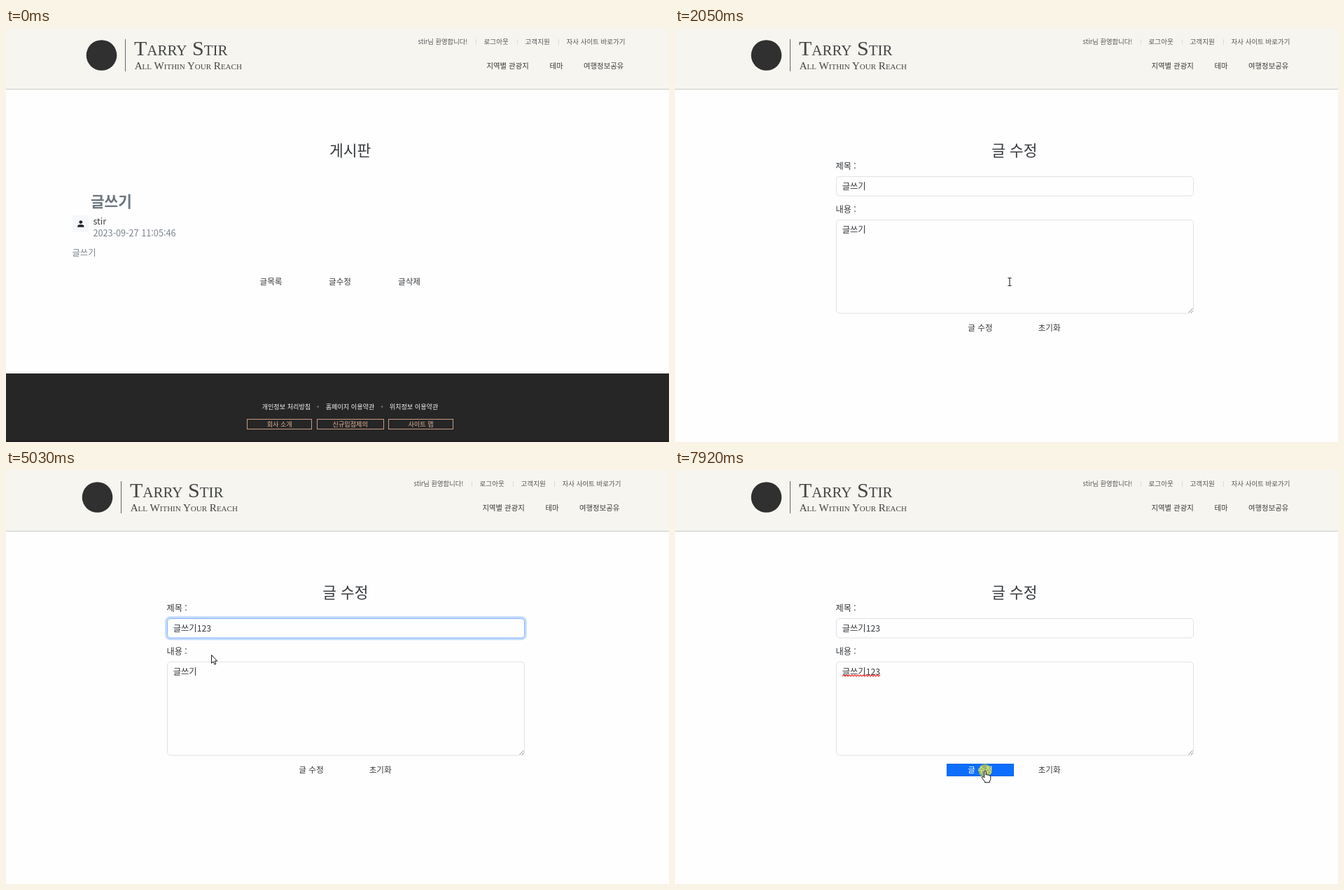
Animation, 947 px wide and 592 px high, one loop 8 s. Source, as an HTML page:

```html
<!DOCTYPE html>
<html lang="ko">
<head>
<meta charset="utf-8">
<title>게시판</title>
<style>
html, body { margin: 0; width: 100%; height: 100%; overflow: hidden; background: #fefefe; }
svg { display: block; width: 947px; height: 592px; }
text { font-family: "Noto Sans CJK KR", "Noto Sans KR", "Noto Sans CJK", "Noto Sans CJK JP", "Noto Sans", sans-serif; white-space: pre; }
.brand { font-family: "Liberation Serif", serif; font-variant: small-caps; }
</style>
</head>
<body>
<svg id="stage" viewBox="0 0 947 592" xmlns="http://www.w3.org/2000/svg"></svg>
<script>
const NS = 'http://www.w3.org/2000/svg';
const stage = document.getElementById('stage');
const LOOP = 8000, SWAP = 2050;
const PAPER = '#fefefe', TEXT = '#35383c', MUTED = '#7a838a';

function add(parent, tag, attrs, content) {
  const e = document.createElementNS(NS, tag);
  for (const k in attrs) e.setAttribute(k, attrs[k]);
  if (content) e.textContent = content;
  parent.appendChild(e);
  return e;
}
const group = (parent = stage) => add(parent, 'g', {});
const rect = (p, x, y, width, height, fill, more) => add(p, 'rect', { x, y, width, height, fill, ...more });
// Text is placed by its left edge and the vertical middle of its glyphs.
const label = (p, s, x, mid, size, fill = TEXT, weight = 400) =>
  add(p, 'text', { x, y: mid + size * 0.38, 'font-size': size, fill, 'font-weight': weight }, s);
const show = (e, on) => e.setAttribute('visibility', on ? 'inherit' : 'hidden');

// Header
rect(stage, 0, 0, 947, 87, '#f6f5f0');
rect(stage, 0, 87, 947, 1, '#cbcac8');
const head = group();
add(head, 'circle', { cx: 136.5, cy: 39, r: 21.8, fill: '#303030' });
rect(head, 170, 16, 1, 46, '#666');
add(head, 'text', { class: 'brand', x: 183, y: 39, 'font-size': 30, fill: '#444' }, 'Tarry Stir');
add(head, 'text', { class: 'brand', x: 183.7, y: 59, 'font-size': 15.1, fill: '#444' }, 'All Within Your Reach');
[['stir님 환영합니다!', 588.5, 9.3], ['로그아웃', 682.5, 9.6], ['고객지원', 741.5, 9.6], ['자사 사이트 바로가기', 800.5, 9.5]]
  .forEach(([s, x, size]) => label(head, s, x, 19.5, size, '#555'));
[671, 730, 789].forEach(x => rect(head, x, 16, 1, 8, '#dddcd8'));
[['지역별 관광지', 686.5], ['테마', 776.5], ['여행정보공유', 825]]
  .forEach(([s, x]) => label(head, s, x, 54.5, 10.4, '#383838'));

// A borderless button that is filled while the pointer is over it
function button(p, s, x, y, textX, fill, stroke) {
  const box = rect(p, x + .5, y + .5, 95, 17, fill, { stroke });
  const text = label(p, s, textX, y + 8.5, 11.6);
  const hit = (px, py) => px >= x && px <= x + 96 && py >= y && py <= y + 18;
  return {
    hit,
    set(on) {
      show(box, on);
      text.setAttribute('fill', on ? '#fff' : TEXT);
    }
  };
}

// Post page
const post = group();
label(post, '게시판', 462, 175.2, 21.5, TEXT, 300);
label(post, '글쓰기', 121, 248, 21.3, '#6c757d', 700);
rect(post, 95, 268, 23, 24, '#f6f7fa');
add(post, 'circle', { cx: 106.8, cy: 277.6, r: 2.4, fill: '#212529' });
add(post, 'path', { d: 'M102.2 284.8v-1.4c0-3.2 9.2-3.2 9.2 0v1.4z', fill: '#212529' });
label(post, 'stir', 124.5, 276.3, 12.6);
label(post, '2023-09-27 11:05:46', 124.5, 293.5, 12.7, MUTED, 300);
label(post, '글쓰기', 94.5, 321, 12.3, MUTED, 300);
const postButtons = [
  button(post, '글목록', 330, 354, 362.5, '#2d2d2d', '#0d6efd'),
  button(post, '글수정', 429, 354, 461, '#2d2d2d', '#198754'),
  button(post, '글삭제', 528, 354, 560, '#2d2d2d', '#dc3545')
];
rect(post, 0, 494, 947, 98, '#262626');
rect(post, 0, 590, 947, 2, '#211f20');
[['개인정보 처리방침', 365.5], ['홈페이지 이용약관', 456.7], ['위치정보 이용약관', 547.7]]
  .forEach(([s, x]) => label(post, s, x, 541.3, 9.15, '#f4f4f4', 500));
[445.5, 537].forEach(cx => add(post, 'circle', { cx, cy: 541.5, r: 1.2, fill: '#777' }));
[['회사 소개', 344, 93, 372.7], ['신규입점제의', 444, 96, 466.6], ['사이트 맵', 546, 93, 574.5]]
  .forEach(([s, x, w, tx]) => {
    rect(post, x + .5, 559.5, w - 1, 14, 'none', { stroke: '#c99b82' });
    label(post, s, tx, 566.3, 9.1, '#e3b195');
  });

// Edit page
function field(p, y, h, mid) {
  const ring = rect(p, 228.9, y - 1.6, 513.2, h + 3.2, 'none',
    { rx: 5.5, stroke: '#0d6efd', 'stroke-width': 3.2 });
  const box = rect(p, 230.5, y, 510, h, PAPER, { rx: 4.5 });
  const text = label(p, '글쓰기', 238.7, mid, 12.3);
  const caret = rect(p, 273, mid - 7, 1, 14, '#212529');
  return {
    set(focus, typed, caretOn) {
      ring.setAttribute('stroke-opacity', .25 * focus);
      const mix = (a, b) => Math.round(a + (b - a) * focus);
      box.setAttribute('stroke', `rgb(${mix(222, 134)},${mix(226, 183)},${mix(230, 254)})`);
      text.textContent = '글쓰기' + '123'.slice(0, typed);
      caret.setAttribute('x', 273 + Math.round(typed * 6.9));
      show(caret, caretOn);
    }
  };
}
const edit = group();
label(edit, '글 수정', 452.3, 175.2, 21.4, TEXT, 300);
label(edit, '제목 :', 229.5, 197, 12.2);
label(edit, '내용 :', 229.5, 259.5, 12.2);
const subject = field(edit, 212.5, 27.5, 226);
const body = field(edit, 274.5, 133.5, 288);
add(edit, 'path', { d: 'M733.5 407l6-6M737 407l2.5-2.5', stroke: '#666', 'stroke-width': .8 });
let wave = 'M239 295';
for (let i = 1; i <= 27; i++) wave += `L${239 + i * 2} ${i % 2 ? 293 : 295}`;
const squiggle = add(edit, 'path', { d: wave, fill: 'none', stroke: '#f22', 'stroke-width': 1.1 });
const editButtons = [
  button(edit, '글 수정', 388, 420, 418.3, '#0d6efd', '#0b62e3'),
  button(edit, '초기화', 487, 420, 518.7, '#0d6efd', '#0b62e3')
];

// Pointer
const halo = add(stage, 'circle', { r: 9.5, fill: '#ffec00', 'fill-opacity': .55 });
const pointer = group();
const ink = { fill: '#fff', stroke: '#111', 'stroke-width': 1, 'stroke-linejoin': 'round' };
const shapes = {
  arrow: add(pointer, 'path', { d: 'M.5 .5V12.2L3 9.8L4.9 14L6.8 13.1L5 9.1H8.6Z', ...ink }),
  hand: add(pointer, 'path', {
    d: 'M-1.2 10V1.5Q-1.2 .3 0 .3T1.2 1.5V6Q2.5 5 3.5 6.3Q5 5.6 5.8 6.9Q7.8 6.4 7.8 8.5V11.5Q7.8 13.5 6.3 15V16.8H-.5V15.4L-4.6 10.3Q-4.9 8.2-2.9 8.6Z', ...ink
  }),
  beam: add(pointer, 'path', { d: 'M-2.5 -5.5H-.7L0 -5L.7 -5.5H2.5M0 -5V5M-2.5 5.5H-.7L0 5L.7 5.5H2.5', fill: 'none', stroke: '#222', 'stroke-width': 1.1 })
};

// time, x, y
const route = [
  [130, 781, 432], [270, 720, 398], [410, 648, 362], [520, 600, 348], [620, 566, 356], [720, 524, 380], [820, 498, 392],
  [950, 498, 392], [1090, 489, 383], [1300, 482, 372], [1480, 479, 366], [1650, 478, 364],
  [2050, 478, 363], [2580, 478, 363], [2720, 446, 312], [2860, 407, 253], [3000, 392.5, 230],
  [4750, 392.5, 230], [4820, 290, 236], [4900, 181, 248], [4960, 230, 257], [5030, 293, 264], [5170, 302, 275], [5310, 300, 281],
  [6070, 300, 281], [6200, 356, 304], [6330, 417, 326], [6420, 433, 332],
  [6880, 433, 332], [6980, 440, 368], [7080, 444.5, 402.5], [7200, 444, 420], [7400, 443, 428], [7640, 443, 430]
];
function place(t) {
  const i = route.findIndex(p => p[0] > t);
  if (i < 0) return route[route.length - 1].slice(1);
  if (i === 0) return route[0].slice(1);
  const [t0, x0, y0] = route[i - 1], [t1, x1, y1] = route[i];
  const k = (t - t0) / (t1 - t0);
  return [x0 + (x1 - x0) * k, y0 + (y1 - y0) * k];
}

const within = (t, spans) => spans.some(([a, b]) => t >= a && t < b);
const count = (t, times) => times.filter(a => t >= a).length;
const fade = (t, start) => {
  const k = Math.min(1, Math.max(0, (t - start) / 180));
  return k * k * (3 - 2 * k);
};
const clicks = [[1850, 1920], [3350, 3520], [5510, 5720], [7710, 8000]];

function draw(t) {
  const editing = t >= SWAP;
  const [x, y] = place(t);
  show(post, !editing);
  show(edit, editing);
  head.setAttribute('transform', `translate(${editing ? -6 : 0})`);

  const live = t >= 130;
  let over = false;
  (editing ? editButtons : postButtons).forEach(b => {
    const on = live && b.hit(x, y);
    b.set(on);
    over = over || on;
  });

  subject.set(fade(t, 3350) - fade(t, 5510), count(t, [4280, 4380, 4480]),
    within(t, [[3350, 3880], [4280, 4980]]));
  body.set(fade(t, 5510) - fade(t, 7640), count(t, [6070, 6210, 6350]),
    within(t, [[5510, 6880], [7380, 7640]]));
  show(squiggle, t >= 7710);

  const inField = editing && x > 230 && x < 741 && ((y > 212 && y < 240) || (y > 274 && y < 408));
  const kind = over ? 'hand' : inField ? 'beam' : 'arrow';
  for (const k in shapes) show(shapes[k], live && k === kind);
  pointer.setAttribute('transform', `translate(${x.toFixed(1)} ${y.toFixed(1)})`);

  halo.setAttribute('cx', x);
  halo.setAttribute('cy', y);
  show(halo, within(t, clicks));
}

const begin = performance.now();
function tick() {
  draw((performance.now() - begin) % LOOP);
  requestAnimationFrame(tick);
}
draw(0);
requestAnimationFrame(tick);
</script>
</body>
</html>
```
